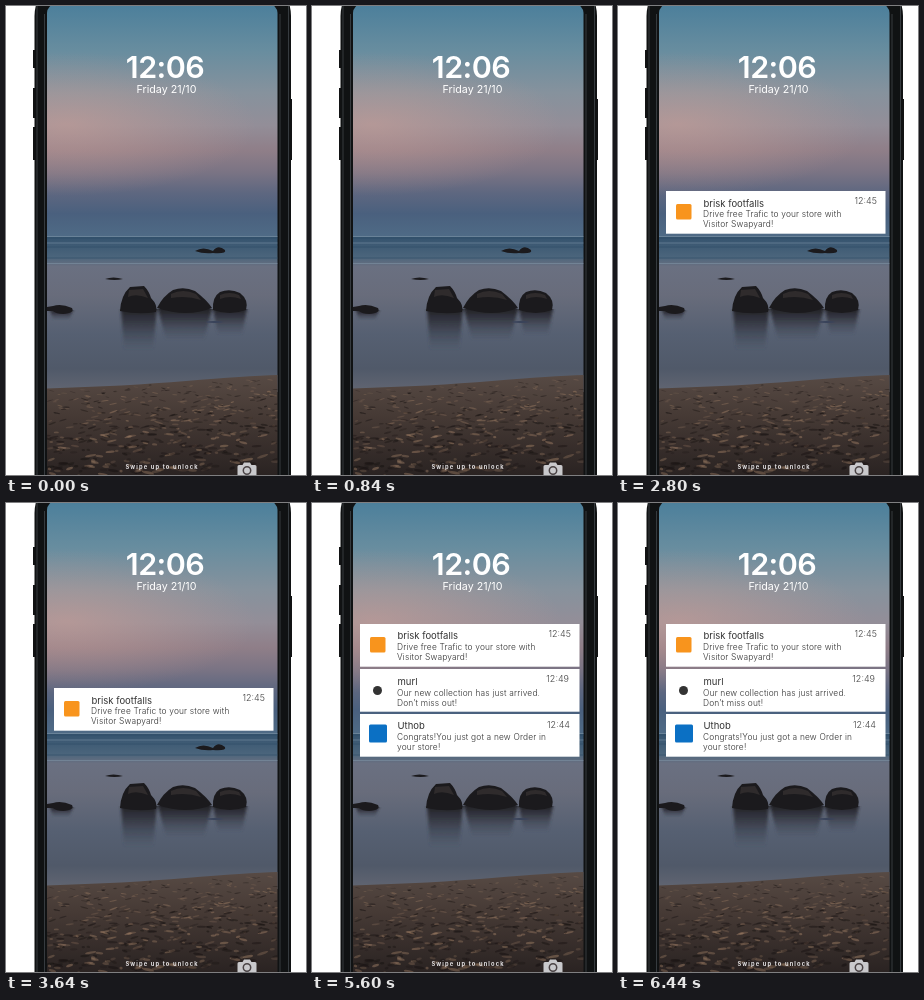
These frames come from a looping animation (300x469 px, 7 s). An HTML page:

```html
<!DOCTYPE html>
<html lang="en">
<head>
<meta charset="utf-8">
<title>Lock screen notifications</title>
<style>
  html, body { margin: 0; width: 100%; height: 100%; overflow: hidden; background: #fff; }
  svg { display: block; width: 100%; height: 100%; }
  text { font-family: Inter, "Open Sans", sans-serif; }
  .clock { font-size: 30.5px; font-weight: 600; fill: #fff; letter-spacing: -.6px; }
  .date { font-size: 10.7px; fill: #fff; }
  .hint { font-size: 5.7px; font-weight: 700; fill: #e4e2e4; letter-spacing: 1.15px; }
  .title { font-size: 9.5px; fill: #333; }
  .body { font-size: 8.4px; font-weight: 300; fill: #333; letter-spacing: .17px; }
  .time { font-size: 9px; font-weight: 300; fill: #444; }
</style>
</head>
<body>
<svg viewBox="0 0 300 469">
  <defs>
    <linearGradient id="sky" x2="0" y2="1">
      <stop offset="0" stop-color="#4b7f9b"/>
      <stop offset=".2" stop-color="#688d9f"/>
      <stop offset=".38" stop-color="#86929d"/>
      <stop offset=".52" stop-color="#938e98"/>
      <stop offset=".63" stop-color="#8f7e88"/>
      <stop offset=".72" stop-color="#7b7484"/>
      <stop offset=".81" stop-color="#5e6780"/>
      <stop offset=".9" stop-color="#4a607e"/>
      <stop offset="1" stop-color="#4f6b86"/>
    </linearGradient>
    <radialGradient id="glow">
      <stop offset="0" stop-color="#cfa096" stop-opacity=".55"/>
      <stop offset="1" stop-color="#cfa096" stop-opacity="0"/>
    </radialGradient>
    <linearGradient id="sea" x2="0" y2="1">
      <stop offset="0" stop-color="#35536e"/>
      <stop offset=".13" stop-color="#4b657c"/>
      <stop offset=".19" stop-color="#6a7081"/>
      <stop offset=".38" stop-color="#686c7b"/>
      <stop offset=".62" stop-color="#566072"/>
      <stop offset=".85" stop-color="#505969"/>
      <stop offset="1" stop-color="#626672"/>
    </linearGradient>
    <linearGradient id="sand" x2="0" y2="1">
      <stop offset="0" stop-color="#574a44"/>
      <stop offset=".4" stop-color="#463a35"/>
      <stop offset="1" stop-color="#2a2322"/>
    </linearGradient>
    <linearGradient id="shade" x2="0" y2="1">
      <stop offset="0" stop-color="#1f1f24"/>
      <stop offset=".3" stop-color="#272a32" stop-opacity=".75"/>
      <stop offset="1" stop-color="#3c4353" stop-opacity="0"/>
    </linearGradient>
    <filter id="soft"><feGaussianBlur stdDeviation="1.5 .5"/></filter>
    <clipPath id="screen"><rect x="41" y="-2" width="230.5" height="500" rx="9"/></clipPath>
  </defs>

  <path d="M27 44h4v18h-4zM27 82h4v30h-4zM27 121h4v33h-4zM283 93h3v61h-3z" fill="#121314"/>
  <rect x="28.5" y="-30" width="256.500" height="560" rx="40" fill="#101213"/>
  <path d="M31 0V469M38.500 8V469M274 8V469M282.500 0V469" stroke="#363b3f"/>

  <g clip-path="url(#screen)">
    <rect x="41" y="-2" width="231" height="233" fill="url(#sky)"/>
    <ellipse cx="60" cy="118" rx="190" ry="72" fill="url(#glow)"/>
    <rect x="41" y="231" width="231" height="155" fill="url(#sea)"/>
    <path d="M41 230.500H272M41 237H272M41 257.500H272" stroke="#8499ab" stroke-opacity=".5"/>
    <path d="M41 232H272M41 241H272M41 252H272" stroke="#2c4a65" stroke-opacity=".6"/>

    <g fill="url(#shade)" filter="url(#soft)">
      <path d="M115 303h36l-4 42h-29z"/>
      <path d="M152 303h54l-8 32h-38z"/>
      <path d="M207 303h34l-5 27h-24z"/>
      <path d="M44 304h23l-4 11h-16z"/>
    </g>
    <g fill="#1b1a1d">
      <path d="M114 305Q115 289 124 281L138 280Q143 285 145 292Q152 299 150 306Q133 309 114 305Z"/>
      <path d="M151 302Q157 290 167 284Q178 280 189 285Q201 294 206 302Q181 312 151 302Z"/>
      <path d="M207 304Q206 291 214 286Q224 282 234 287Q243 294 240 304Q224 310 207 304Z"/>
      <path d="M41 301l6-1Q55 297 66 302Q69 307 57 308Q50 308 47 305L41 305Z"/>
      <path d="M99 273q8-3 18 0q-8 2-18 0zM189 245q8-5 18 0q5-7 12-1q2 4-12 3q-10 1-18-2z"/>
      <path d="M199 316q9-2 19 0q-9 2-19 0z" fill="#39435a"/>
    </g>
    <path d="M123 284l14-1l5 9q-12-5-20-1zM165 288q12-6 25 0l5 6q-14-5-30-2zM214 289q9-4 19 0l2 4q-11-4-21 0z" fill="#48413f" opacity=".45"/>

    <path d="M41 382.500Q120 380 180 375T272 369V469H41Z" fill="url(#sand)"/>
    <g id="ripples"></g>
  </g>

  <text class="clock" x="159" y="72" text-anchor="middle">12:06</text>
  <text class="date" x="160.500" y="86.700" text-anchor="middle">Friday 21/10</text>
  <text class="hint" x="156" y="463" text-anchor="middle">Swipe up to unlock</text>
  <path d="M231.500 460.500q0-1.500 1.500-1.500h3.500l1.500-2.500h6l1.500 2.500h3.500q1.500 0 1.500 1.500v9h-19z" fill="#c9c9cc"/>
  <circle cx="241" cy="464.500" r="3.700" fill="#c9c9cc" stroke="#4a4345" stroke-width="1.500"/>

  <g id="cards"></g>
</svg>
<script>
const HOLD = 1400;
const cards = document.getElementById('cards');

const square = (x, y, size, color) =>
  `<rect x="${x}" y="${y}" width="${size}" height="${size}" rx="1.5" fill="${color}"/>`;

const apps = {
  shop: {
    title: 'Uthob', time: '12:44', timeEnd: 258,
    lines: ['Congrats!You just got a new Order in', 'your store!'],
    icon: square(57, 10.5, 18, '#0b70c4')
  },
  visits: {
    title: 'brisk footfalls', time: '12:45', timeEnd: 259,
    lines: ['Drive free Trafic to your store with', 'Visitor Swapyard!'],
    icon: square(58, 13, 15.5, '#f8941d')
  },
  fashion: {
    title: 'murl', time: '12:49', timeEnd: 257,
    lines: ['Our new collection has just arrived.', 'Don’t miss out!'],
    icon: '<circle cx="65.5" cy="21.5" r="4.5" fill="#333"/>'
  }
};

// Each scene lists [app, card top, title baseline offset, time baseline offset].
const scenes = [
  [],
  [['shop', 139, 15.5, 13.5]],
  [['visits', 185, 15.5, 13]],
  [['fashion', 231, 16, 12.5]],
  [['visits', 121, 15, 12.5], ['fashion', 166, 16, 12.5], ['shop', 211, 15, 13.5]]
];

function card([name, top, titleY, timeY]) {
  const { title, time, timeEnd, lines, icon } = apps[name];
  return `<g transform="translate(0 ${top})">
    <rect x="48" width="219.5" height="42.7" fill="#fff"/>${icon}
    <text class="title" x="85.5" y="${titleY}">${title}</text>
    <text class="time" x="${timeEnd}" y="${timeY}" text-anchor="end">${time}</text>
    ${lines.map((line, i) =>
      `<text class="body" x="85" y="${titleY + 10.5 + i * 10}">${line}</text>`).join('')}
  </g>`;
}

// Sand texture: small dark hollows and lit ridges that grow towards the viewer.
function drawRipples() {
  let seed = 11;
  const random = () => (seed = seed * 16807 % 2147483647) / 2147483647;
  let marks = '';
  for (let i = 0; i < 520; i++) {
    const depth = random();
    const x = 41 + random() * 231;
    const y = 385 - (x - 41) * .058 + depth * 88;
    const color = random() < .58 ? '#171211' : '#94765f';
    marks += `<ellipse cx="${x}" cy="${y}" rx="${1.5 + random() * (2 + depth * 3)}" ry="${.4 + depth}"
      fill="${color}" opacity="${.2 + random() * .35}" transform="rotate(${random() * 40 - 20} ${x} ${y})"/>`;
  }
  document.getElementById('ripples').innerHTML = marks;
}

let shown = -1;
function render(ms) {
  const index = Math.floor(ms / HOLD) % scenes.length;
  if (index === shown) return;
  shown = index;
  cards.innerHTML = scenes[index].map(card).join('');
}

function tick() {
  render(performance.now());
  requestAnimationFrame(tick);
}

drawRipples();
tick();
</script>
</body>
</html>
```
